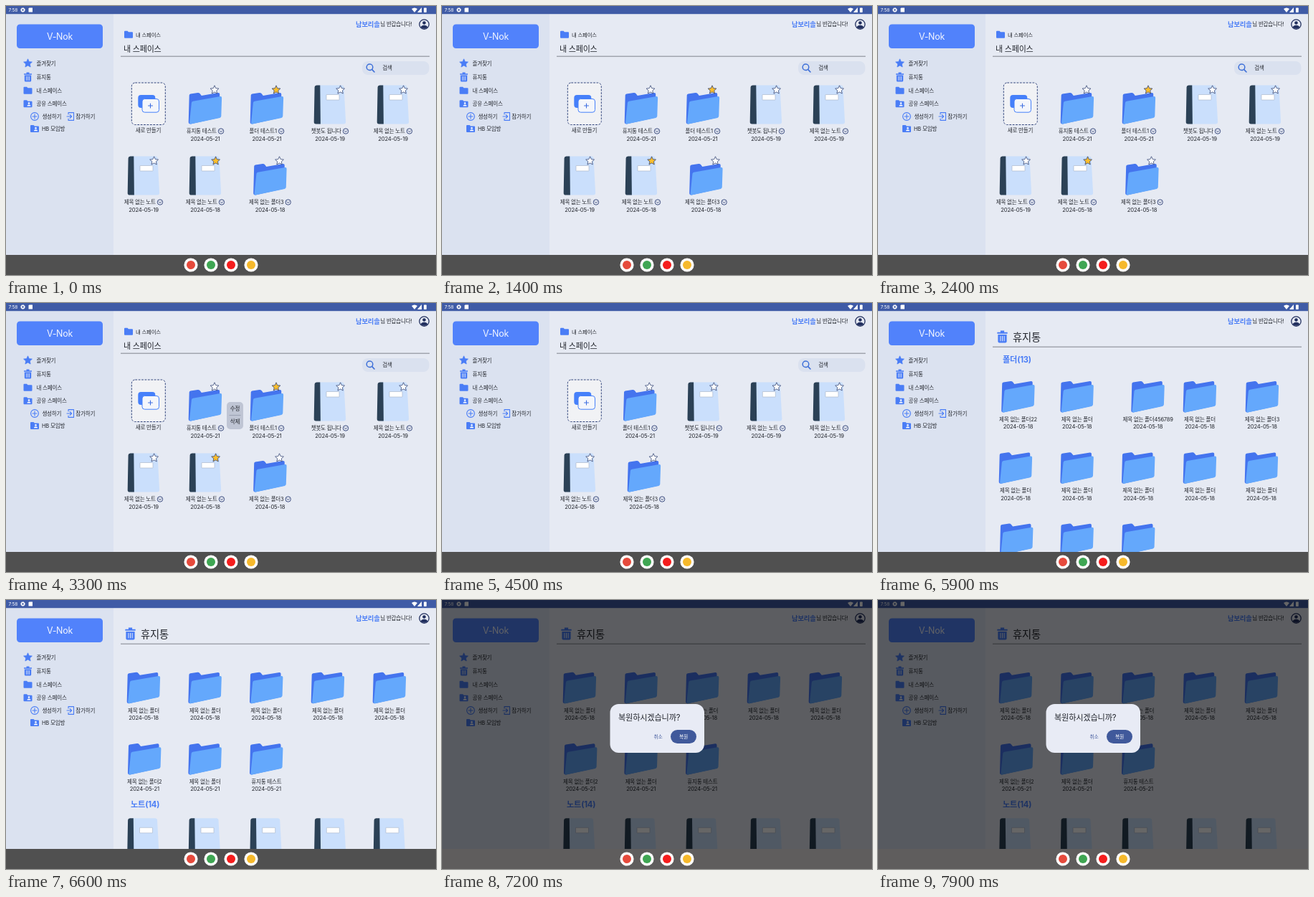
Write an HTML page that moves like this. It is 600 px wide and 375 px high and loops after 8000 ms.

```html
<!DOCTYPE html>
<html lang="ko">
<head>
<meta charset="utf-8">
<style>
html, body { margin: 0; height: 100%; overflow: hidden; background: #e6eaf3; }
svg { display: block; width: 600px; height: 375px; }
text { font-family: Inter, "Noto Sans CJK KR", "Noto Sans CJK", sans-serif; letter-spacing: -.2px; }
</style>
</head>
<body>
<svg id="stage" viewBox="0 0 600 375" xmlns="http://www.w3.org/2000/svg"></svg>
<script>
const BLUE = '#4a7df6', NAVY = '#2a3b72', INK = '#23262d', RULE = '#92959e';
const pen = document.createElement('canvas').getContext('2d');
pen.font = '7.5px Inter, "Noto Sans CJK KR", "Noto Sans CJK", sans-serif';
const widthOf = s => pen.measureText(s).width - .2 * s.length;

// y is the visual middle of the line
const text = (s, x, y, size = 7.5, fill = INK, anchor = 'start', weight = 400) =>
  `<text x="${x}" y="${y + size * .37}" font-size="${size}" fill="${fill}" text-anchor="${anchor}" font-weight="${weight}">${s}</text>`;
const mid = (s, x, y, size, fill, weight) => text(s, x, y, size, fill, 'middle', weight);
const rect = (x, y, w, h, fill, r = 0, more = '') =>
  `<rect x="${x}" y="${y}" width="${w}" height="${h}" rx="${r}" fill="${fill}" ${more}/>`;
const disc = (x, y, r, fill, more = '') => `<circle cx="${x}" cy="${y}" r="${r}" fill="${fill}" ${more}/>`;
const path = (d, fill, more = '') => `<path d="${d}" fill="${fill}" ${more}/>`;
const line = (d, color, w = 1) =>
  path(d, 'none', `stroke="${color}" stroke-width="${w}" stroke-linecap="round" stroke-linejoin="round"`);
const at = (x, y, body, scale = 1) => `<g transform="translate(${x} ${y}) scale(${scale})">${body}</g>`;
const group = (id, body) => `<g id="${id}">${body}</g>`;

function star(x, y, r, fill, stroke) {
  const points = Array.from({ length: 10 }, (_, i) => {
    const a = i * Math.PI / 5 - Math.PI / 2, d = i % 2 ? r * .47 : r;
    return `${(x + d * Math.cos(a)).toFixed(2)},${(y + d * Math.sin(a)).toFixed(2)}`;
  }).join(' ');
  return `<polygon points="${points}" fill="${fill}" stroke="${stroke}" stroke-width=".8" stroke-linejoin="round"/>`;
}

const folder = (cx, y) => at(cx - 23.5, y,
  path('M1.2 5Q1.2 3.2 3 2.9L13 1.4Q15 1.2 16 2.6L18.3 5.5L41.5 1.6Q43.6 1.4 43.7 3.3V36L3 45Q0 45 .2 42Z', '#4474ee') +
  path('M4.4 15.4Q4.6 13.6 6.6 13.2L44.6 6.6Q46.7 6.4 46.6 8.6L45.8 34Q45.6 36 43.8 36.4L3.6 45Q1.3 45.4 1.6 43Z', '#64a8fc'));

const notebook = (cx, y) => at(cx - 22.5, y,
  path('M6 .4H39Q41.8 .4 42 3L44.6 51.5Q44.6 54.4 41.8 54.6H6Z', '#cadffc') +
  path('M4 .4H8.8L9.4 54.6H3Q.1 54.4 .2 51.5L1.1 3Q1.3 .5 4 .4Z', '#2b4156') +
  rect(17.5, 13.5, 18, 7.5, '#fff', .5, 'stroke="#a3b0c4" stroke-width=".6"'));

const dir = (x, y) => at(x, y, path('M-6-4Q-6-5-5-5H-1.5L0-3.5H5Q6-3.5 6-2.5V4Q6 5 5 5H-5Q-6 5-6 4Z', BLUE));
const sharedDir = (x, y) => dir(x, y) +
  at(x + 1.5, y + .3, disc(0, -1, 1.3, '#fff') + path('M-2.6 3Q-2.6 .9 0 .9T2.6 3Z', '#fff'));
const bin = (x, y, scale = 1) => at(x, y,
  path('M-5.5-4.8H5.5V-3.2H-5.5ZM-2-6.5H2V-4.8H-2Z', BLUE) +
  path('M-4.7-2.4H4.7V5Q4.7 6.5 3.2 6.5H-3.2Q-4.7 6.5-4.7 5Z', BLUE) +
  line('M-2-.5V4.4M0-.5V4.4M2-.5V4.4', '#dfe7f8', .8), scale);

function entry(kind, cx, row, name, date, starred) {
  const y = row * 99, w = widthOf(name), left = cx - (w + 10.5) / 2, chev = left + w + 6.2;
  const isDir = kind === folder;
  return kind(cx, y + (isDir ? 119.5 : 110)) +
    star(cx + (isDir ? 13 : 14.6), y + 117, 6.2, starred ? '#fbbd2c' : '#fff', '#344675') +
    text(name, left, y + 174.5) +
    disc(chev, y + 174.5, 3.7, 'none', `stroke="${NAVY}" stroke-width=".9"`) +
    line(`M${chev - 1.8} ${y + 173.8}l1.8 1.8l1.8-1.8`, NAVY, .9) +
    mid('2024-05-' + date, cx, y + 185, 7.7);
}

function frameUi() {
  const signal = path('M566 4Q570 .8 574 4L570 9ZM574 9L580 2V9Z', '#fff') + rect(583, 2.5, 3.8, 6.5, '#fff', .8);
  const gear = disc(23.5, 5.5, 2, 'none', 'stroke="#fff" stroke-width="1.4"') +
    disc(23.5, 5.5, 2.9, 'none', 'stroke="#fff" stroke-width=".8" stroke-dasharray="1.2 1.08"');
  return rect(0, 0, 600, 375, '#e6eaf3') + rect(0, 11, 150, 336, '#dbe2f0') + rect(0, 0, 600, 11.2, '#3f5ba6') +
    text('7:58', 3.5, 5.6, 6.6, '#fff') + gear + path('M32.5 2.5H37V8.5H31.5V3.5Z', '#fff') + signal +
    rect(15, 25.5, 120, 33.5, '#5182fb', 4.5) + mid('V-Nok', 75, 42.7, 12.4, '#f3f6ff') +
    star(30.5, 80, 6.2, BLUE, BLUE) + text('즐겨찾기', 42.5, 80) +
    bin(30.5, 99) + text('휴지통', 42.5, 99) +
    dir(30.5, 117.8) + text('내 스페이스', 42.5, 117.8) +
    sharedDir(30.5, 136.2) + text('공유 스페이스', 42.5, 136.2) +
    disc(40, 154, 5.4, 'none', `stroke="${BLUE}" stroke-width="1.1"`) + line('M37 154H43M40 151V157', BLUE, 1.1) +
    text('생성하기', 50.4, 154) +
    line('M87 151V148.6H94.5V159.4H87V157M85 154H91.5M89.2 151.6L91.6 154L89.2 156.4', BLUE, 1.1) +
    text('참가하기', 97.3, 154) +
    sharedDir(40, 171) + text('HB 모임방', 50, 171) +
    text('남보리솔', 521.5, 25.6, 9.3, BLUE, 'end', 700) + text('님 반갑습니다!', 522.3, 25.6) +
    disc(583.5, 25.6, 6.7, 'none', 'stroke="#22305f" stroke-width="1.3"') +
    disc(583.5, 23.5, 2.3, '#22305f') + path('M578.6 29.6Q580 26.8 583.5 26.8T588.4 29.6Q586.5 31.8 583.5 31.8T578.6 29.6Z', '#22305f');
}

function homeUi() {
  return dir(171, 39.8) + text('내 스페이스', 181, 39.8, 7.4) + text('내 스페이스', 164, 59.5, 11) +
    rect(160, 69.6, 431, 1.2, RULE) +
    rect(497, 77, 93.5, 19, '#dae1ef', 8) +
    disc(507.5, 85.3, 4.3, 'none', 'stroke="#3d6fd8" stroke-width="1.5"') + line('M510.8 88.6L514 92', '#3d6fd8', 1.6) +
    text('검색', 525.3, 86.5) +
    rect(175.3, 107, 47, 58.5, '#f1f2f5', 5, 'stroke="#33467c" stroke-width="1" stroke-dasharray="2.8 1.6"') +
    rect(184.3, 124, 24, 18, '#4680fa', 4) +
    rect(190, 129.5, 23.5, 18.7, '#f4f6fb', 3.5, 'stroke="#4680fa" stroke-width="1"') +
    line('M198.5 139H204.5M201.5 136V142', '#3f6ee0', 1.1) +
    mid('새로 만들기', 198.5, 172.8);
}

const BLANK = '제목 없는 노트', DIR = '제목 없는 폴더', CHAT = '챗봇도 됩니다', JUNK = '휴지통 테스트';
const before = [
  [folder, 278, 0, JUNK, 21], [folder, 364, 0, '폴더 테스트1', 21, true],
  [notebook, 452, 0, CHAT, 19], [notebook, 540, 0, BLANK, 19],
  [notebook, 192, 1, BLANK, 19], [notebook, 278, 1, BLANK, 18, true], [folder, 368.5, 1, DIR + 3, 18]
];
const after = [
  [folder, 276.3, 0, '폴더 테스트1', 21], [notebook, 364.8, 0, CHAT, 19],
  [notebook, 452.3, 0, BLANK, 19], [notebook, 540, 0, BLANK, 19],
  [notebook, 192, 1, BLANK, 18], [folder, 282, 1, DIR + 3, 18]
];
const entries = list => list.map(e => entry(...e)).join('');

function trashList() {
  const cols = [192, 277.7, 363.3, 449, 535];
  const rows = [
    [[DIR + 22, 3.5], [DIR], [DIR + 456789, 13.3], [DIR], [DIR + 3, 1]],
    cols.map(() => [DIR]),
    [[DIR + 2, 1.3], [DIR], [JUNK]]
  ];
  const cells = rows.map((row, r) => row.map(([name, dx = 0], c) => {
    const x = cols[c] + dx, y = r * 99.3;
    return folder(x, y + 107.5) + mid(name, x, y + 162) + mid('2024-05-' + (r < 2 ? 18 : 21), x, y + 172.5, 7.7);
  }).join('')).join('');
  return text('폴더(13)', 174, 78.5, 11.2, BLUE, 'start', 700) + cells +
    text('노트(14)', 174, 392, 11.2, BLUE, 'start', 700) +
    [191.5, 277, 362.7, 452.3, 535].map(x => notebook(x, 411.3)).join('');
}

const trashUi = () => bin(173.5, 47, 1.3) + text('휴지통', 188, 47.6, 14.3) + rect(160, 60.6, 431, 1.2, RULE) +
  `<g clip-path="url(#pane)">${group('list', trashList())}</g>`;

const menuUi = () => rect(308, 138, 23, 38, '#bfc5d4', 5) + mid('수정', 319.5, 147) +
  rect(311.5, 156, 16, .7, '#8d94a5') + mid('삭제', 319.5, 165.3);

const dialogUi = () => rect(234.5, 145, 131.5, 68, '#e8ebf5', 12) + text('복원하시겠습니까?', 246, 164, 11.2) +
  mid('취소', 301.5, 190.3, 6.8, '#445c9f') + rect(319, 181, 36, 19, '#40599b', 9.5) +
  mid('복원', 337, 190.3, 6.8, '#fff', 500);

const dock = () => rect(0, 347, 600, 28, '#505050', 0, 'id="bar"') +
  ['#e64a3c', '#3fa653', '#f51d1d', '#f6b92c'].map((color, i) =>
    disc(258 + i * 28, 361, 9.6, '#fff') + disc(258 + i * 28, 361, 6, color)).join('');

const $ = id => document.getElementById(id);
$('stage').innerHTML = '<clipPath id="pane"><rect x="150" y="69" width="450" height="278"/></clipPath>' +
  frameUi() + group('home', homeUi()) + group('before', entries(before)) + group('after', entries(after)) +
  group('menu', menuUi()) + group('trash', trashUi()) +
  group('shade', rect(0, 0, 600, 347, '#000', 0, 'fill-opacity=".6"')) + dock() + group('dialog', dialogUi());

const LOOP = 8000, MENU = 2500, REMOVE = 3900, TRASH = 5200, SCROLL = 6050, ASK = 6950;
const ramp = (t, start, span) => Math.min(1, Math.max(0, (t - start) / span));
const show = (id, on) => $(id).setAttribute('display', on ? 'inline' : 'none');

function draw(now) {
  const t = now % LOOP;
  show('home', t < TRASH);
  show('before', t < REMOVE);
  show('after', t >= REMOVE && t < TRASH);
  show('menu', t >= MENU && t < REMOVE);
  show('trash', t >= TRASH);
  const scroll = 107.5 * (1 - (1 - ramp(t, SCROLL, 480)) ** 2);
  $('list').setAttribute('transform', `translate(0 ${-scroll})`);
  const ask = ramp(t, ASK, 180);
  $('shade').setAttribute('opacity', ask);
  $('dialog').setAttribute('opacity', ask);
  $('bar').setAttribute('fill', ask ? '#5f5d5d' : '#505050');
  requestAnimationFrame(draw);
}
requestAnimationFrame(draw);
</script>
</body>
</html>
```
